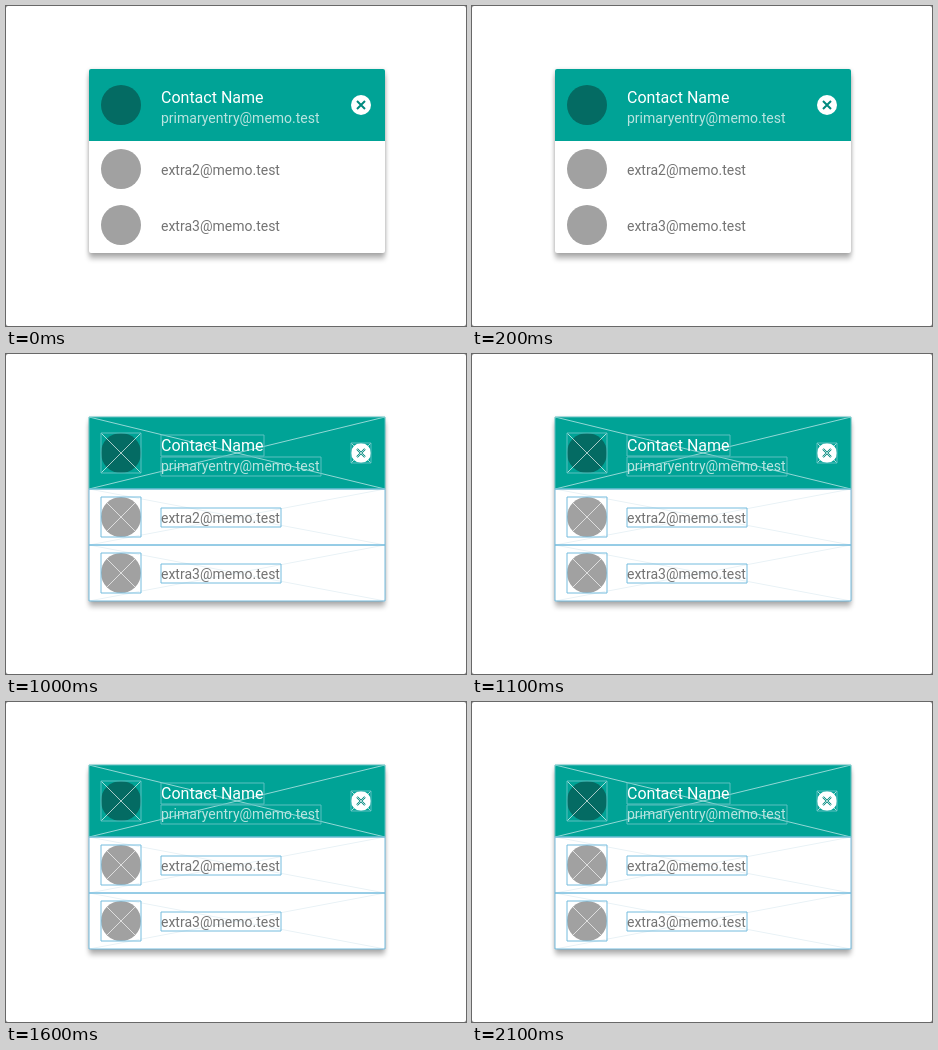
These frames come from a looping animation (460 px wide and 320 px high, 2200 ms). An HTML page:

```html
<!DOCTYPE html>
<html lang="en">
<head>
<meta charset="utf-8">
<title>Contact card layout</title>
<style>
  html, body { margin: 0; width: 100%; height: 100%; overflow: hidden; background: #777; }
  #stage { position: relative; width: 460px; height: 320px; border-radius: 2px; background: #fff; overflow: hidden; }
  #card {
    position: absolute; left: 83px; top: 63px; width: 296px; height: 184px;
    border-radius: 2px; background: #fff;
    box-shadow: 0 6px 5px rgba(0, 0, 0, .25), 0 1px 4px rgba(0, 0, 0, .2);
  }
  svg { position: absolute; left: 0; top: 0; }
  text { font: 14px Roboto, Arial, sans-serif; fill: #737373; }
  .title { font-size: 16px; fill: #fff; }
  .lead { fill: #b9e4e0; }
  #guides { fill: none; stroke-width: 1; }
</style>
</head>
<body>
<div id="stage">
  <div id="card"></div>
  <svg width="460" height="320" viewBox="0 0 460 320">
    <path d="M83 135V65a2 2 0 0 1 2-2H377a2 2 0 0 1 2 2V135Z" fill="#00a396"/>
    <g id="rows"></g>
    <circle cx="115" cy="99" r="20" fill="#046b63"/>
    <circle cx="115" cy="163" r="20" fill="#a1a1a1"/>
    <circle cx="115" cy="219" r="20" fill="#a1a1a1"/>
    <circle cx="355" cy="99" r="10" fill="#fff"/>
    <path d="M351 95l8 8M359 95l-8 8" stroke="#00897e" stroke-width="2"/>
    <g id="guides"></g>
    <text class="title" x="155" y="97">Contact Name</text>
    <text class="lead" x="155" y="117">primaryentry@memo.test</text>
    <text x="155" y="169">extra2@memo.test</text>
    <text x="155" y="225">extra3@memo.test</text>
  </svg>
</div>
<script>
  const LOOP = 2200, SHOW = 1000;
  const BLUE = '#74bcde', PALE = '#e9f2f6', MINT = '#5cc0c0', CROSS = 'rgba(255,255,255,.65)';
  const rows = document.getElementById('rows');
  const guides = document.getElementById('guides');

  function line(parent, d, stroke) {
    const p = document.createElementNS('http://www.w3.org/2000/svg', 'path');
    p.setAttribute('d', d);
    p.setAttribute('stroke', stroke);
    parent.append(p);
  }
  // Outlines are centred on the element edges
  const box = (x, y, w, h, color) =>
    line(guides, `M${x} ${y}h${w}v${h}h${-w}Z`, color);
  const cross = (parent, x, y, w, h, color) =>
    line(parent, `M${x} ${y}l${w} ${h}M${x + w} ${y}l${-w} ${h}`, color);

  // Containers
  cross(guides, 83, 63, 296, 72, 'rgba(225,245,248,.65)');
  box(83, 63, 296, 72, MINT);
  for (const y of [135, 191]) {
    cross(rows, 83, y, 296, 56, PALE);
    box(83, y, 296, 56, BLUE);
  }

  // Avatars and close button
  for (const y of [79, 143, 199]) {
    cross(guides, 95, y, 40, 40, CROSS);
    box(95, y, 40, 40, y < 135 ? MINT : BLUE);
  }
  cross(guides, 345, 89, 20, 20, CROSS);
  box(345, 89, 20, 20, MINT);

  // Text
  box(155, 81, 103, 21, MINT);
  box(155, 103, 160, 19, MINT);
  box(155, 154, 120, 19, BLUE);
  box(155, 210, 120, 19, BLUE);

  const at = SHOW / LOOP;
  for (const layer of [rows, guides]) {
    layer.animate([
      { opacity: 0, offset: 0 },
      { opacity: 0, offset: at },
      { opacity: 1, offset: at },
      { opacity: 1, offset: 1 }
    ], { duration: LOOP, iterations: Infinity });
  }
</script>
</body>
</html>
```
